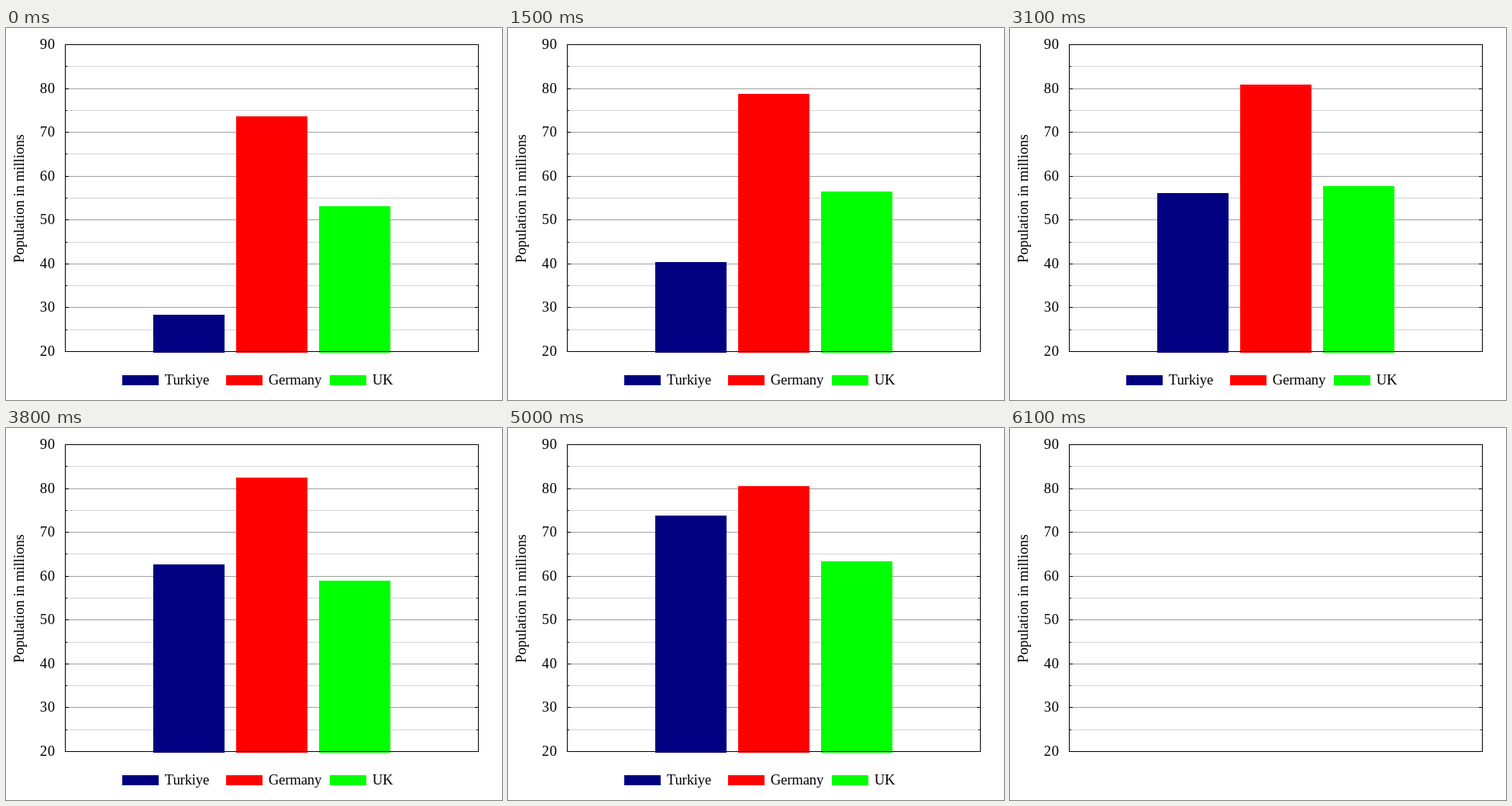
Write an HTML page that moves like this. It is 640 by 480 pixels and loops after 6200 ms.

```html
<!DOCTYPE html>
<html lang="en">
<head>
<meta charset="utf-8">
<title>Population</title>
<style>
  html, body { margin: 0; width: 100%; height: 100%; overflow: hidden; background: #fff; }
  svg { display: block; width: 640px; height: 480px; }
  rect { shape-rendering: crispEdges; }
  text { font: 18.67px "Liberation Serif", "Times New Roman", serif; fill: #000; }
  .tick { letter-spacing: 0.6px; }
  .key { letter-spacing: -0.15px; }
</style>
</head>
<body>
<svg id="chart" viewBox="0 0 640 480"></svg>
<script>
const chart = document.getElementById('chart');
const LEFT = 76, RIGHT = 609, TOP = 21, BASE = 417;
const FRAME = 100, YEARS = 61;

// Turning points: [years since 1961, millions]
const series = [
  { name: 'Turkiye', color: '#000080', keys: [
    [0, 28.15], [9, 34.88], [18, 42.99], [24, 49.13], [42, 66.09], [48, 71.34], [54, 78.5], [60, 85.04]] },
  { name: 'Germany', color: '#ff0000', keys: [
    [0, 73.38], [5, 76.6], [8, 77.91], [13, 78.97], [17, 78.09], [20, 78.41], [25, 77.7], [29, 79.43],
    [32, 81.16], [36, 82.03], [42, 82.53], [49, 81.78], [50, 80.27], [52, 80.65], [55, 82.35], [60, 83.2]] },
  { name: 'UK', color: '#00ff00', keys: [
    [0, 52.8], [4, 54.35], [10, 55.9], [14, 56.23], [22, 56.33], [28, 57.08],
    [42, 59.65], [46, 61.32], [52, 64.13], [60, 67.33]] }
];

function add(tag, attrs, parent = chart) {
  const el = document.createElementNS('http://www.w3.org/2000/svg', tag);
  for (const key in attrs) el.setAttribute(key, attrs[key]);
  return parent.appendChild(el);
}

function box(x, y, width, height, fill, parent) {
  return add('rect', { x, y, width, height, fill }, parent);
}

function label(str, attrs, parent) {
  add('text', attrs, parent).textContent = str;
}

const yOf = value => Math.round(BASE - (value - 20) * (BASE - TOP) / 70);

const slope = (p, q) => (q[1] - p[1]) / (q[0] - p[0]);

// Tangent that never overshoots: flat at peaks, harmonic mean elsewhere.
function tangent(keys, i) {
  const last = keys.length - 1;
  if (i === 0) return slope(keys[0], keys[1]);
  if (i === last) return slope(keys[last - 1], keys[last]);
  const a = slope(keys[i - 1], keys[i]), b = slope(keys[i], keys[i + 1]);
  return a * b > 0 ? 2 * a * b / (a + b) : 0;
}

// Cubic Hermite curve through the turning points.
function valueAt(keys, year) {
  const n = Math.max(1, keys.findIndex(k => k[0] >= year));
  const [x0, y0] = keys[n - 1], [x1, y1] = keys[n];
  const w = x1 - x0, t = (year - x0) / w, u = 1 - t;
  return y0 * u * u * (1 + 2 * t) + y1 * t * t * (3 - 2 * t)
    + w * t * u * (u * tangent(keys, n - 1) - t * tangent(keys, n));
}

for (let v = 20; v <= 90; v += 5) {
  const y = yOf(v), major = v % 10 === 0;
  const tick = major ? 5 : 3;
  box(LEFT, y, RIGHT - LEFT, 1, major ? '#a0a0a0' : '#d3d3d3');
  box(LEFT, y, tick, 1, '#000');
  box(RIGHT - tick + 1, y, tick, 1, '#000');
  if (major) label(v, { class: 'tick', x: 43.8, y: y + 6 });
}
label('Population in millions', { transform: 'translate(23 303) rotate(-90)' });

const content = add('g', {});
const bars = series.map(({ name, color }, i) => {
  const x = 150 + 134 * i;
  box(x, 448, 47, 13, color, content);
  label(name, { class: 'key', x: x + 54.8, y: 460 }, content);
  return box(190 + 107 * i, BASE, 92, 2, color, content);
});

box(LEFT, TOP, RIGHT - LEFT + 1, 1, '#000');
box(LEFT, BASE, RIGHT - LEFT + 1, 1, '#000');
box(LEFT, TOP, 1, BASE - TOP + 1, '#000');
box(RIGHT, TOP, 1, BASE - TOP + 1, '#000');

function draw() {
  const year = Math.floor(performance.now() / FRAME) % (YEARS + 1);
  const visible = year < YEARS;
  content.setAttribute('visibility', visible ? 'visible' : 'hidden');
  if (visible) {
    bars.forEach((bar, i) => {
      const y = yOf(valueAt(series[i].keys, year)) - 1;
      bar.setAttribute('y', y);
      bar.setAttribute('height', BASE + 2 - y);
    });
  }
  requestAnimationFrame(draw);
}
draw();
</script>
</body>
</html>
```
